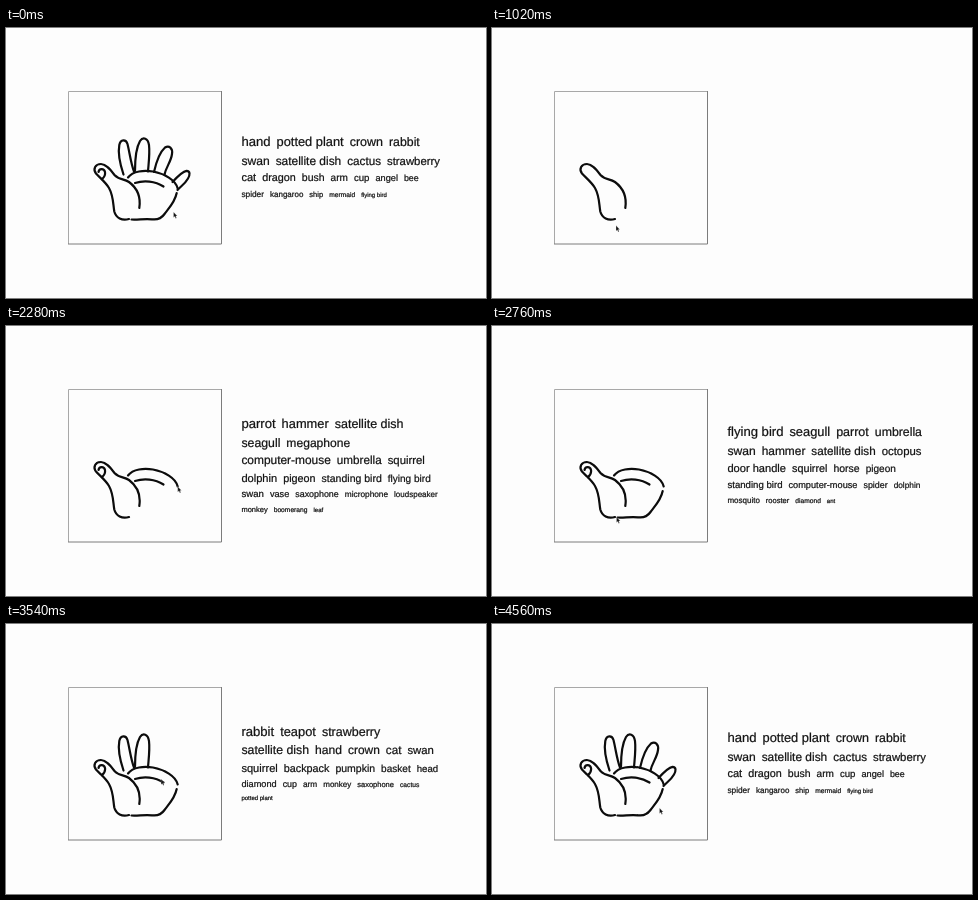
Recreate the animation shown at these times as an HTML page. Size 480 by 270 pixels, loop 4.68 s.

```html
<!DOCTYPE html>
<html lang="en">
<head>
<meta charset="utf-8">
<title>Sketch guesses</title>
<style>
  html, body { margin: 0; width: 100%; height: 100%; overflow: hidden; background: #fdfdfd; }
  svg { display: block; width: 100%; height: 100%; }
  text {
    font-family: "Liberation Sans", Arial, Helvetica, sans-serif;
    text-rendering: geometricPrecision;
    fill: #141414; stroke: #141414; stroke-width: .22;
  }
  #frame path { fill: none; }
  #ink path { fill: none; stroke: #0c0c0c; stroke-width: 2.2; stroke-linecap: round; stroke-linejoin: round; }
</style>
</head>
<body>
<svg viewBox="0 0 480 270">
  <g id="frame">
    <path d="M62.5 216V63.5H215" stroke="#a8a8a8"/>
    <path d="M215.5 63V216H62" stroke="#7c7c7c"/>
  </g>
  <g id="ink"></g>
  <g id="words"></g>
  <path id="cursor" d="M0 0V5.5L1.3 4.4 2.2 6.4 3.1 6 2.3 4.1H3.8Z" fill="#151515" stroke="#fff" stroke-width=".25"/>
</svg>
<script>
const LOOP = 4680, STEP = 60, RESET = 60;
const NS = "http://www.w3.org/2000/svg";
const byId = id => document.getElementById(id);

function add(parent, tag, attrs, text) {
  const el = document.createElementNS(NS, tag);
  for (const k in attrs) el.setAttribute(k, attrs[k]);
  if (text) el.textContent = text;
  return parent.appendChild(el);
}

// Pointer journey: start, end, path, and whether it leaves ink.
const moves = [
  [60, 420, "M167.5 184Q150 200 133.3 180"],
  [420, 960, "M133.3 180C135 169 131 160 123 154C118 150.500 113 152 108.500 147C104 141 100 136 95 136C89.500 136 86.500 141 90 145.500C93 149 99.500 154 103 160C107.500 168 107 176 108.300 183.500C110 190 116 193 123 191", 1],
  [960, 1020, "M123 191L124 197.500"],
  [1020, 1080, "M124 197.500L124 218"],
  [1080, 1260, "M124 218C100 222 66 170 92.500 144"],
  [1260, 1440, "M92.500 144C93 140.500 98 140 99 144C99.500 147 98 149.500 96 151", 1],
  [1440, 1680, "M96 151Q112 172 129 155"],
  [1680, 1860, "M129 155C138 152 149 153 157.500 158.500", 1],
  [1860, 2040, "M157.500 158.500C165 225 110 215 122 149.500"],
  [2040, 2280, "M122 149.500C127 143 138 142 147 143.500C158 145.500 170 152 171.700 160.500", 1],
  [2280, 2400, "M171.700 160.500L170.700 165"],
  [2400, 2760, "M170.700 165C169 174 163 180 158.500 186C155 191 151 192 146 191.300C138 190.500 132 192 125.500 191.500", 1],
  [2760, 3000, "M124.500 191Q118 175 117.500 146.500"],
  [3000, 3240, "M117.500 146.500C114 136 112 124 113.300 117C114.500 111 120 111 121.500 116C123.500 124 125 136 128 143.500", 1],
  [3240, 3300, "M128 143.500L129 143"],
  [3300, 3480, "M129 143C129 131 130.500 119 134 113C137 108.500 142 110 143 117C144 126 142.500 136 142 143.500", 1],
  [3480, 3540, "M142 143.500L155 155"],
  [3540, 3600, "M155 155L148 144"],
  [3600, 3760, "M148 144C150 135 154 124 159 119.500C163 117 167 120 166 126C165 134 160 139 158.500 146.500", 1],
  [3760, 3900, "M158.500 146.500Q168 185 166.500 154"],
  [3900, 4140, "M166.500 154C171 149 176 143.500 180.500 142.800C184.500 143 184 147 182 150.500C179 156 174.500 158.500 171.500 162", 1],
  [4140, 4260, "M171.500 162L167.500 184"]
].map(([from, to, d, ink]) => {
  const el = add(byId("ink"), "path", { d, visibility: "hidden" });
  return { from, to, ink, el, len: el.getTotalLength() };
});

// Guesses shrink with rank.
const sizes = [13.1, 12.85, 12.5, 12.3, 12.1, 11.93, 11.7, 11.35, 11.1, 10.8,
  10.5, 10.05, 9.65, 9.2, 8.9, 8.3, 8, 7.5, 6.7, 6];

// Each row: baseline, then comma-separated guesses.
const lists = [
  [1080, [
    [101.2, "parrot,microphone,arm"],
    [119.6, "satellite dish,dolphin"],
    [137.5, "computer-mouse,leaf,diamond"],
    [155, "penguin,head-phones,boomerang"],
    [171, "ice-cream-cone,baseball bat,banana,owl"],
    [185.7, "moon,strawberry,shovel,vase,sword"]]],
  [1980, [
    [102, "parrot,hammer,satellite dish"],
    [120.5, "seagull,megaphone"],
    [138.3, "computer-mouse,umbrella,squirrel"],
    [155.8, "dolphin,pigeon,standing bird,flying bird"],
    [171.3, "swan,vase,saxophone,microphone,loudspeaker"],
    [185.5, "monkey,boomerang,leaf"]]],
  [2400, [
    [110.2, "flying bird,seagull,parrot,umbrella"],
    [128.8, "swan,hammer,satellite dish,octopus"],
    [146.2, "door handle,squirrel,horse,pigeon"],
    [162, "standing bird,computer-mouse,spider,dolphin"],
    [176.5, "mosquito,rooster,diamond,ant"]]],
  [3540, [
    [111.6, "rabbit,teapot,strawberry"],
    [130.2, "satellite dish,hand,crown,cat,swan"],
    [147.6, "squirrel,backpack,pumpkin,basket,head"],
    [163.3, "diamond,cup,arm,monkey,saxophone,cactus"],
    [176.3, "potted plant"]]],
  [4260, [
    [117.9, "hand,potted plant,crown,rabbit"],
    [136.5, "swan,satellite dish,cactus,strawberry"],
    [153.2, "cat,dragon,bush,arm,cup,angel,bee"],
    [168.5, "spider,kangaroo,ship,mermaid,flying bird"]]]
].map(([from, rows]) => {
  const g = add(byId("words"), "g", {});
  let rank = 0;
  for (const [y, row] of rows) {
    const line = add(g, "text", { x: 235.4, y });
    row.split(",").forEach((word, i) =>
      add(line, "tspan", { dx: i ? 6 : 0, "font-size": sizes[rank++] }, word));
  }
  return { from, g };
});

const clamp = x => Math.max(0, Math.min(1, x));
const smooth = x => x * x * (3 - 2 * x);

function draw(ms) {
  let t = Math.floor((ms % LOOP) / STEP) * STEP;
  if (t < RESET) t += LOOP;

  let tip;
  for (const m of moves) {
    const p = clamp((t - m.from) / (m.to - m.from));
    if (t >= m.from) tip = m.el.getPointAtLength(m.len * (m.ink ? p : smooth(p)));
    if (!m.ink) continue;
    m.el.setAttribute("visibility", p > 0 ? "visible" : "hidden");
    m.el.setAttribute("stroke-dasharray", p < 1 ? `${p * m.len} ${m.len + 9}` : "none");
  }
  byId("cursor").setAttribute("transform", `translate(${tip.x} ${tip.y})`);

  const current = lists.filter(l => t >= l.from).pop();
  for (const l of lists) l.g.setAttribute("visibility", l === current ? "visible" : "hidden");
}

const start = performance.now();
function tick() {
  draw(performance.now() - start);
  requestAnimationFrame(tick);
}
tick();
</script>
</body>
</html>
```
